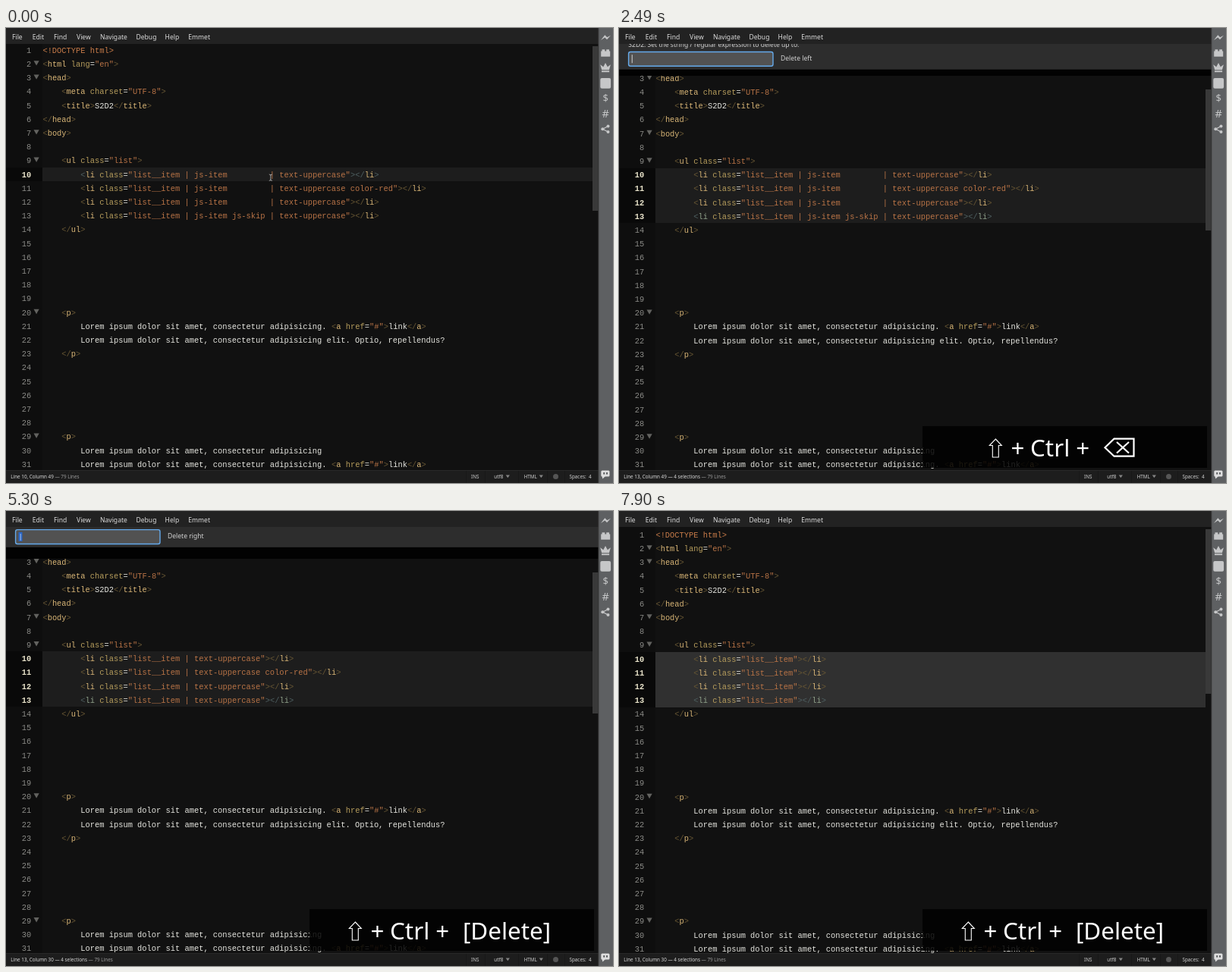
An HTML page with a canvas for the animation above (8000 ms loop, 800 by 600 pixels).

```html
<!DOCTYPE html>
<html lang="en">
<head>
<meta charset="utf-8">
<title>Editor</title>
<style>
html, body { margin: 0; width: 100%; height: 100%; overflow: hidden; background: #111; }
canvas { display: block; width: 800px; height: 600px; }
</style>
</head>
<body>
<canvas id="stage" width="800" height="600"></canvas>
<script>
const ctx = document.getElementById('stage').getContext('2d');
const LOOP = 8000, LEFT = 48.4, CHAR = 6.24, ROW = 18.2;
const MONO = '"Liberation Mono", monospace', SANS = '"Noto Sans", sans-serif';
const COLOR = {
  text: '#e6e6e0', bracket: '#685734', tag: '#d8b576', attr: '#b59c5c', string: '#b87346',
  doctype: '#c77b49', matchBracket: '#4f6062', matchTag: '#8fa08a'
};
const LOREM = 'Lorem ipsum dolor sit amet, consectetur adipisicing';
const LINK = LOREM + '. <a href="#">link</a>';
const FOLDS = [2, 3, 7, 9, 20, 29];
const DOC = {
  1: '<!DOCTYPE html>', 2: '<html lang="en">', 3: '<head>',
  4: '    <meta charset="UTF-8">', 5: '    <title>S2D2</title>', 6: '</head>', 7: '<body>',
  9: '    <ul class="list">', 14: '    </ul>',
  20: '    <p>', 21: '        ' + LINK, 22: '        ' + LOREM + ' elit. Optio, repellendus?', 23: '    </p>',
  29: '    <p>', 30: '        ' + LOREM, 31: '        ' + LINK
};
const TOKEN = /(<!.*?>)|("[^"]*")|(<\/?|\/?>)|((?<=<\/?)\w+)|(\s*[\w-]+(?==))|([^<>"=]+|=)/g;
const KINDS = ['doctype', 'string', 'bracket', 'tag', 'attr', 'text'];

function rect(x, y, w, h, fill) {
  ctx.fillStyle = fill;
  ctx.fillRect(x, y, w, h);
}

function box(x, y, w, h, r, fill, stroke) {
  ctx.beginPath();
  ctx.roundRect(x, y, w, h, r);
  ctx.fillStyle = fill;
  ctx.fill();
  if (stroke) {
    ctx.strokeStyle = stroke;
    ctx.lineWidth = 1.4;
    ctx.stroke();
  }
}

function label(str, x, y, size, fill, align = 'left', weight = 400, family = SANS) {
  ctx.font = `${weight} ${size}px ${family}`;
  ctx.fillStyle = fill;
  ctx.textAlign = align;
  ctx.fillText(str, x, y);
  return ctx.measureText(str).width;
}

function shape(points, fill) {
  ctx.beginPath();
  points.forEach(([x, y]) => ctx.lineTo(x, y));
  ctx.closePath();
  ctx.fillStyle = fill;
  ctx.fill();
}

function line(points, color, width, closed) {
  ctx.beginPath();
  points.forEach(([x, y]) => ctx.lineTo(x, y));
  if (closed) ctx.closePath();
  ctx.strokeStyle = color;
  ctx.lineWidth = width;
  ctx.stroke();
}

// Quartic ease-out that is already under way at t0 by `lead` ms.
function slide(t, t0, dur, lead) {
  const u = Math.min(1, (t - t0 + lead) / (dur + lead));
  return 1 - (1 - u) ** 4;
}

function itemLine(n, t) {
  let extra = '';
  if (t < 4510) extra = ' | js-item ' + (n === 13 ? 'js-skip' : '       ') + ' | text-uppercase';
  else if (t < 7420) extra = ' | text-uppercase';
  if (extra && n === 11) extra += ' color-red';
  return `        <li class="list__item${extra}"></li>`;
}

function promptAt(t) {
  if (t >= 2430 && t < 3510) return { kind: 'input', side: 'left', value: t < 3030 ? '' : '|', shown: slide(t, 2430, 240, 30), open: true };
  if (t >= 3510 && t < 4510) return { kind: 'choice', yes: t >= 4270, shown: slide(t, 3510, 60, 35), open: true };
  if (t >= 4510 && t < 4690) return { kind: 'choice', yes: true, shown: 1 - slide(t, 4510, 180, 90), open: false };
  if (t >= 5240 && t < 6880) return { kind: 'input', side: 'right', value: t < 6580 ? '|' : '"', marked: t < 6580, shown: slide(t, 5240, 370, 30), open: true };
  if (t >= 6880 && t < 7420) return { kind: 'choice', yes: false, shown: slide(t, 6880, 60, 35), open: true };
  if (t >= 7420 && t < 7660) return { kind: 'choice', yes: false, shown: 1 - slide(t, 7420, 240, 30), open: false };
  return { shown: 0, open: false };
}

function stateAt(t) {
  const drag = Math.min(1, Math.max(0, (t - 140) / 1380));
  const mouseY = 197 + 49 * drag * drag;
  const last = Math.min(13, 10 + Math.max(0, Math.floor((mouseY - 184) / ROW)));
  const prompt = promptAt(t);
  return {
    mouseY, last, prompt,
    shift: t < 2430 ? 0 : t < 3570 ? 0.67 : t < 5240 ? 1 : t < 6880 ? 1.5 : 2,
    column: t < 4510 ? 49 : t < 4940 ? 31 : 30,
    caret: !prompt.open && t >= 140 && !(t >= 2010 && t < 2430) && t < 7900
  };
}

function codeLine(str, y, match) {
  ctx.font = `10.4px ${MONO}`;
  ctx.textAlign = 'left';
  for (const m of str.matchAll(TOKEN)) {
    let kind = KINDS[m.slice(1).findIndex(Boolean)];
    if (match && kind === 'bracket') kind = 'matchBracket';
    if (match > 1 && kind === 'tag') kind = 'matchTag';
    ctx.fillStyle = COLOR[kind];
    ctx.fillText(m[0], LEFT + m.index * CHAR, y);
  }
}

function editor(t, s) {
  const top = s.prompt.open ? 63 : 21;
  const base = n => 32.8 + s.shift + ROW * (n - 1);
  const rows = s.last - 9;
  rect(0, 21, 781, 562, s.prompt.open ? '#020202' : '#111');
  ctx.save();
  ctx.beginPath();
  ctx.rect(0, top, 781, 583 - top);
  ctx.clip();
  rect(0, top, 781, 583 - top, '#111');
  rect(0, top, 48, 583 - top, '#0e0e0e');
  const y0 = Math.round(base(10) - 12.6);
  const height = Math.round(base(10) - 12.6 + rows * ROW) - y0;
  rect(0, y0, 48, height, '#090909');
  rect(48, y0, 725, height, rows > 1 && !s.prompt.open ? '#303030' : '#1d1d1d');

  for (let n = 1; n <= 31; n++) {
    const y = base(n), active = n >= 10 && n <= s.last;
    label(n, 33.2, y, 10.4, active ? '#ebe5cc' : '#8b8b87', 'right', active ? 700 : 400, MONO);
    if (FOLDS.includes(n)) shape([[36.5, y - 7.8], [43.7, y - 7.8], [40.1, y - 1.4]], '#62625f');
    const str = n >= 10 && n <= 13 ? itemLine(n, t) : DOC[n];
    if (str) codeLine(str, y, n === s.last ? (rows > 1 ? 2 : 1) : 0);
  }
  if (s.caret) rect(Math.floor(LEFT + (s.column - 1) * CHAR - 0.4), y0, 1, height, '#a9a9a5');
  if (s.prompt.open) rect(773, 81, 7.5, 186, '#393939');
  else rect(773, 24, 7.5, 217, '#393939');
  ctx.restore();

  if (t < 2430) {
    const y = s.mouseY;
    line([[346.8, y - 4], [348.8, y - 3.2], [350.8, y - 4]], '#c4c4c4', 0.8);
    line([[348.8, y - 3.5], [348.8, y + 4]], '#c4c4c4', 0.8);
    line([[346.8, y + 4.4], [348.8, y + 3.7], [350.8, y + 4.4]], '#c4c4c4', 0.8);
  }
}

function button(str, x, w, fill, focus) {
  box(x, 40.2, w, 18.6, 2, fill, focus ? '#7bb6ee' : null);
  label(str, x + w / 2, 52.5, 8.2, '#fff', 'center', 700);
}

function promptBar(p) {
  if (!p.kind) return;
  ctx.save();
  ctx.beginPath();
  ctx.rect(0, 21, 781, 562);
  ctx.clip();
  ctx.translate(0, -42 * (1 - p.shown));
  rect(0, 63, 781, 1.5, 'rgba(0,0,0,.45)');
  rect(0, 21, 781, 42, '#2d2d2d');
  if (p.kind === 'choice') {
    label('Include the string?', 12.3, 33.3, 8.57, '#d2d2d2');
    button('No', 12.8, 27.8, '#bf222d', !p.yes);
    button('Yes', 45, 29.5, '#276bc0', p.yes);
  } else {
    label('S2D2: Set the string / regular expression to delete up to:', 12.3, 33.3, 8.57, '#d2d2d2');
    box(12.6, 39.8, 190.4, 18.8, 2.5, '#525252', '#64a9ea');
    if (p.marked) rect(16.5, 43, 5, 12, '#2867c9');
    const w = label(p.value, 16.8, 52.2, 8.57, '#f0f0f0');
    if (!p.marked) rect(16.8 + w, 43.5, 0.8, 11, '#eee');
    label('Delete ' + p.side, 213, 51.3, 8.57, '#d2d2d2');
  }
  ctx.restore();
}

function menu() {
  rect(0, 0, 781, 21, '#222');
  const items = { File: 8, Edit: 34.7, Find: 63, View: 93, Navigate: 124, Debug: 171.5, Help: 209.6, Emmet: 240.3 };
  for (const name in items) label(name, items[name], 14.7, 8.57, '#dcdcdc', 'left', 500);
}

function statusBar(s) {
  const rows = s.last - 9, size = 6.3, y = 594;
  rect(0, 583, 781, 17, '#1d1d1d');
  rect(0, 583, 781, 1, '#292929');
  const pos = `Line ${s.last}, Column ${s.column} ` + (rows > 1 ? `— ${rows} selections ` : '');
  const w = label(pos, 6.3, y, size, '#d8d8d8');
  label('— 79 Lines', 6.3 + w, y, size, '#999');
  for (const x of [606, 631, 675, 713, 736]) rect(x, 584, 1, 16, '#181818');
  label('INS', 613, y, size, '#d0d0d0');
  label('utf8', 643.3, y, size, '#d0d0d0');
  label('HTML', 682.7, y, size, '#d0d0d0');
  label('Spaces:  4', 742.5, y, size, '#d0d0d0');
  for (const x of [661.3, 705.3]) shape([[x - 2.6, 589.6], [x + 2.6, 589.6], [x, 593.3]], '#858585');
  box(721, 588, 7, 7, 3.5, '#555');
}

function sidebar() {
  const c = '#c6c7c8';
  rect(781, 0, 19, 600, '#5e6062');
  rect(780.5, 0, 1, 600, '#444');
  shape([[784, 16], [789.3, 9.3], [792.2, 12.2], [797, 9.7], [792, 15.3], [789.3, 12.6]], c);
  rect(784.2, 30.5, 12, 7.2, c);
  rect(785.5, 28.3, 3.8, 3, c);
  rect(791.2, 28.3, 3.8, 3, c);
  shape([[785.2, 55.3], [783.2, 48.2], [787.3, 51.2], [790, 46], [792.8, 51.2], [796.9, 48.2], [794.9, 55.3]], c);
  rect(785, 56.3, 10.1, 1.9, c);
  box(783.3, 66, 13.8, 13.8, 2, c);
  label('$', 790.2, 97.3, 13, c, 'center');
  label('#', 790.2, 118.2, 14.5, c, 'center');
  line([[794, 129.2], [786.5, 133.2], [794, 137.2]], c, 1.3);
  for (const [x, y] of [[793.5, 129.5], [786.3, 133.2], [793.5, 137]]) box(x - 2, y - 2, 4, 4, 2, c);
  box(784.3, 583.4, 11.2, 8.2, 1.5, '#dedede');
  shape([[785.5, 591], [790, 591], [786.3, 594.6]], '#dedede');
  for (const x of [787.2, 791]) rect(x, 586, 2, 2.6, '#5e6062');
}

function shiftKey(x) {
  line([[x, 542], [x + 8, 550.5], [x + 4, 550.5], [x + 4, 566], [x - 4, 566], [x - 4, 550.5], [x - 8, 550.5]], '#fff', 1.1, true);
}

function keys(t) {
  if (t < 2430) return;
  const del = t >= 5240, dx = del ? -36 : 0;
  rect(400, 525, 375, 55, 'rgba(0,0,0,.85)');
  shiftKey(496.3 + dx);
  const put = (str, x) => label(str, x, 565.3, 31.4, '#fff');
  put('+', 516.5 + dx);
  put('Ctrl', 542 + dx);
  put('+', 602.3 + dx);
  if (del) return put('[Delete]', 602);
  line([[640.5, 553.2], [652.5, 541.7], [678.5, 541.7], [678.5, 564.7], [652.5, 564.7]], '#fff', 2.2, true);
  line([[656, 546], [672, 560.5]], '#fff', 2.2);
  line([[672, 546], [656, 560.5]], '#fff', 2.2);
}

function draw(t) {
  const s = stateAt(t);
  editor(t, s);
  promptBar(s.prompt);
  menu();
  statusBar(s);
  sidebar();
  keys(t);
}

let start;
function tick(now) {
  start ??= now;
  draw((now - start) % LOOP);
  requestAnimationFrame(tick);
}
draw(0);
requestAnimationFrame(tick);
</script>
</body>
</html>
```
